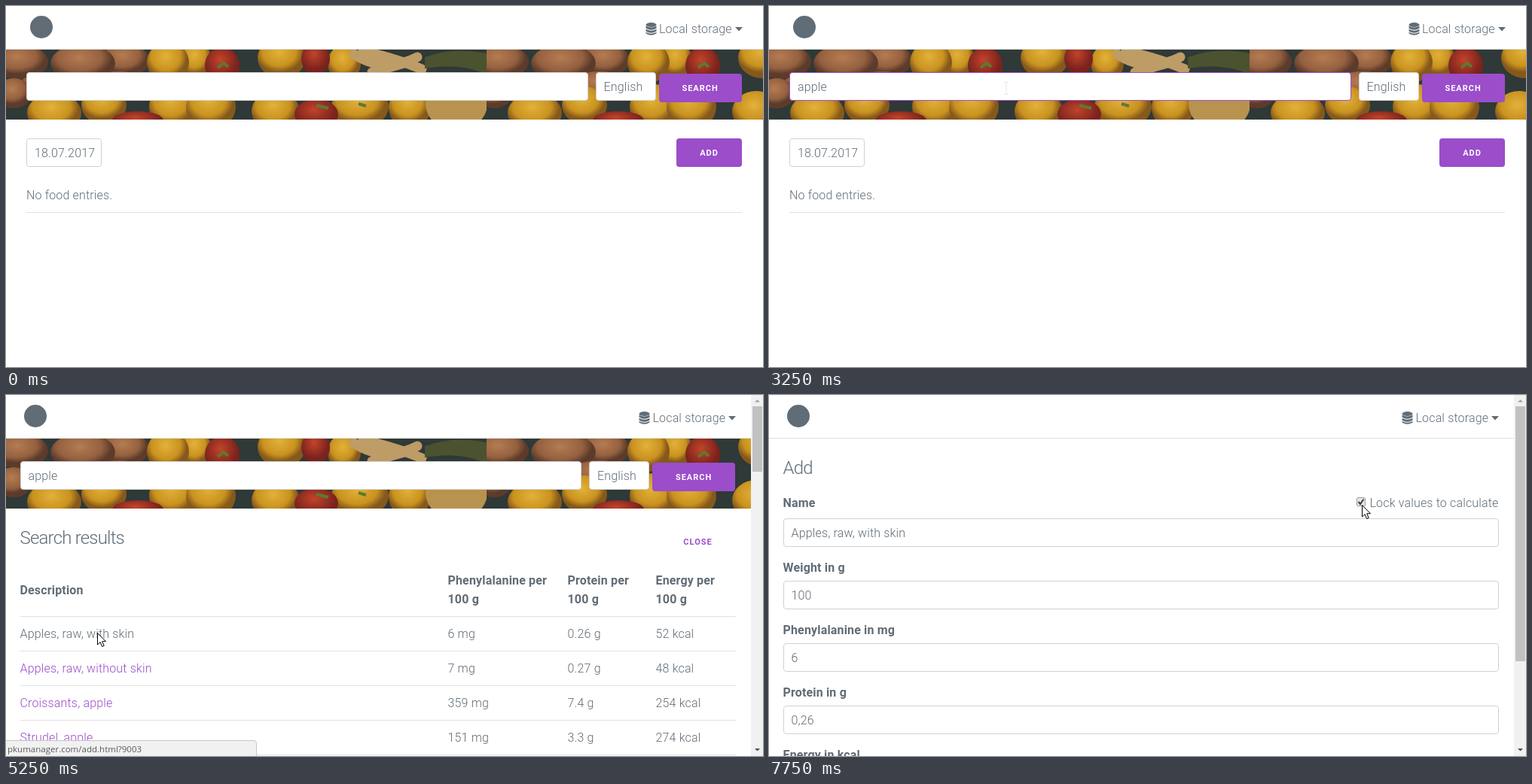
Write an HTML page that moves like this. It is 1005x480 px and loops after 8 s.

```html
<!DOCTYPE html>
<html lang="en">
<head>
<meta charset="utf-8">
<title>Food diary</title>
<style>
html, body { margin: 0; width: 100%; height: 100%; overflow: hidden; background: #fff; }
body { position: relative; color: #606c76; font: 300 16px/26px Roboto, sans-serif; letter-spacing: .01em; }
body *, body *::before { box-sizing: border-box; animation: 0s step-end infinite; }
.layer, .t, .box, .btn, .line, table, svg { position: absolute; }
.layer { left: 0; top: 0; width: 1005px; height: 480px; }
.wrap { position: absolute; top: 0; left: 27px; width: 950px; height: 480px; animation-name: shift; animation-duration: 8s; }
.t { white-space: nowrap; margin-top: -13px; }
b, th { font-weight: 700; }
h4 { margin: -13px 0 0; font-weight: 300; font-size: 24px; letter-spacing: -.8px; }
.box { height: 38px; padding: 0 10px; line-height: 37px; background: #fff; border: 1px solid #d1d1d1; border-radius: 4px; white-space: nowrap; }
.form .box { left: 0; width: 950px; }
.btn { height: 38px; line-height: 39px; text-align: center; border-radius: 4px; background: #9b4dca; color: #fff; font-size: 11px; font-weight: 700; letter-spacing: 1px; }
.plain { background: none; color: #9b4dca; }
.line { height: 1px; background: #e1e1e1; }
.logo { position: absolute; left: 5px; top: 13px; width: 30px; height: 30px; border-radius: 50%; background: #606c76; }

table { top: 234px; left: 0; width: 950px; table-layout: fixed; border-spacing: 0; text-align: left; line-height: 25px; }
th { padding: 0 0 10px; border-bottom: 1px solid #e1e1e1; }
td { padding: 10px 0; border-bottom: 1px solid #e1e1e1; }
td:first-child { color: #9b4dca; }

.caret { display: inline-block; width: 1px; height: 19px; vertical-align: -4px; background: #333; letter-spacing: 0; }
.status { position: absolute; left: -1px; top: 459px; width: 334px; height: 22px; padding-left: 2px; background: #f1f1f1; border: 1px solid #c6c6c6; border-radius: 0 4px 0 0; color: #5a5a5a; font: 400 11.5px/22px "Open Sans", sans-serif; letter-spacing: 0; }
.bar { position: absolute; left: 989px; top: 0; width: 16px; height: 480px; background: #f1f1f1; }
.thumb { position: absolute; left: 2px; top: 15px; width: 13px; height: 87px; background: #c1c1c1; }

/* one 8 s clock, a tick of 250 ms is 3.125% */
.home, .results, .form, .band, .bar, .thumb, .status, .value, .field, .caret, .k, .hot, .tick, .mouse, .arrow, .beam { animation-duration: 8s !important; }
.home { animation-name: home; }
.results { animation-name: results; }
.form { animation-name: form; }
.band { animation-name: band; }
.bar { animation-name: bar; }
.thumb { animation-name: thumb; }
.status { animation-name: status; }
.value { animation-name: value; }
.field { animation-name: focus; }
.caret { animation-name: caret; }
.k { font-size: 0; }
.k1 { animation-name: k1; }
.k2 { animation-name: k2; }
.k3 { animation-name: k3; }
.k4 { animation-name: k4; }
td.hot { animation-name: hot; }
.tick { animation-name: tick; }
.mouse { animation-name: move; }
.arrow { animation-name: arrow; }
.beam { animation-name: beam; }

@keyframes shift { 0% { left: 27px } 43.75% { left: 18.5px } }
@keyframes home { 0% { opacity: 1 } 43.75% { opacity: 0 } }
@keyframes results { 0% { opacity: 0 } 43.75% { opacity: 1 } 68.75% { opacity: 0 } }
@keyframes form { 0% { opacity: 0 } 68.75% { opacity: 1 } }
@keyframes band { 0% { opacity: 1 } 68.75% { opacity: 0 } }
@keyframes bar { 0% { opacity: 0 } 43.75% { opacity: 1 } }
@keyframes thumb { 0% { height: 87px } 68.75% { height: 339px } }
@keyframes status { 0% { opacity: 0 } 59.375% { opacity: 1 } 71.875% { opacity: 0 } }
@keyframes value { 0% { opacity: 0 } 71.875% { opacity: 1 } }
@keyframes focus { 0% { border-color: #d1d1d1 } 15.625% { border-color: #9b4dca } 65.625% { border-color: #d1d1d1 } }
@keyframes caret {
  0% { opacity: 0 } 15.625% { opacity: 1 } 21.875% { opacity: 0 } 25% { opacity: 1 }
  40.625% { opacity: 0 } 46.875% { opacity: 1 } 53.125% { opacity: 0 }
}
@keyframes k1 { 0% { font-size: 0 } 25% { font-size: 16px } }
@keyframes k2 { 0% { font-size: 0 } 28.125% { font-size: 16px } }
@keyframes k3 { 0% { font-size: 0 } 31.25% { font-size: 16px } }
@keyframes k4 { 0% { font-size: 0 } 34.375% { font-size: 16px } }
@keyframes hot { 0% { color: #9b4dca } 59.375% { color: #606c76 } }
@keyframes tick { 0% { opacity: 0 } 96.875% { opacity: 1 } }
@keyframes move {
  0%, 3.125% { transform: translate(462px, 362px) }
  6.25% { transform: translate(418px, 294px) }
  9.375% { transform: translate(372px, 232px) }
  12.5% { transform: translate(315px, 109px) }
  50% { transform: translate(302px, 166px) }
  53.125% { transform: translate(256px, 234px) }
  56.25% { transform: translate(192px, 287px) }
  59.375% { transform: translate(139px, 312px) }
  62.5% { transform: translate(121px, 316px) }
  75% { transform: translate(172px, 296px) }
  78.125% { transform: translate(338px, 234px) }
  81.25% { transform: translate(556px, 189px) }
  84.375% { transform: translate(915px, 183px) }
  87.5% { transform: translate(868px, 158px) }
  90.625% { transform: translate(812px, 149px) }
  93.75% { transform: translate(787px, 146px) }
}
@keyframes arrow {
  0% { opacity: 0 } 3.125% { opacity: 1 } 12.5% { opacity: 0 } 50% { opacity: 1 }
  81.25% { opacity: 0 } 87.5% { opacity: 1 }
}
@keyframes beam { 0% { opacity: 0 } 12.5% { opacity: 1 } 50% { opacity: 0 } 81.25% { opacity: 1 } 87.5% { opacity: 0 } }
</style>
</head>
<body>

<!-- vegetable strip, tiled every 638px -->
<svg class="band" style="left:0;top:58px" width="1005" height="93">
  <defs>
    <radialGradient id="potato" cx=".45" cy=".35"><stop offset="0" stop-color="#b57c52"/><stop offset=".7" stop-color="#94603f"/><stop offset="1" stop-color="#5c3b2b"/></radialGradient>
    <radialGradient id="yellow" cx=".45" cy=".35"><stop offset="0" stop-color="#e2b23a"/><stop offset=".7" stop-color="#c9921f"/><stop offset="1" stop-color="#85581c"/></radialGradient>
    <radialGradient id="red" cx=".45" cy=".35"><stop offset="0" stop-color="#c2442a"/><stop offset="1" stop-color="#7a221d"/></radialGradient>
    <clipPath id="tile"><path d="M0 0h638v93H0z"/></clipPath>
    <g id="veg" clip-path="url(#tile)">
      <path fill="#2f3937" d="M0 0h638v93H0z"/>
      <g fill="url(#potato)">
        <ellipse cx="18" cy="16" rx="38" ry="23"/><ellipse cx="158" cy="14" rx="32" ry="22"/>
        <ellipse cx="102" cy="18" rx="43" ry="25"/><ellipse cx="55" cy="52" rx="42" ry="20"/>
        <ellipse cx="10" cy="58" rx="24" ry="20"/><ellipse cx="150" cy="48" rx="42" ry="19"/>
      </g>
      <g fill="url(#yellow)">
        <ellipse cx="252" cy="14" rx="21" ry="24"/><ellipse cx="215" cy="17" rx="28" ry="27"/>
        <ellipse cx="366" cy="11" rx="32" ry="27"/><ellipse cx="449" cy="18" rx="22" ry="24"/>
        <ellipse cx="64" cy="84" rx="36" ry="26"/><ellipse cx="130" cy="74" rx="30" ry="25"/>
        <ellipse cx="222" cy="76" rx="32" ry="30"/><ellipse cx="272" cy="76" rx="33" ry="30"/>
        <ellipse cx="358" cy="82" rx="32" ry="27"/><ellipse cx="470" cy="76" rx="38" ry="28"/>
        <ellipse cx="536" cy="77" rx="28" ry="28"/>
      </g>
      <g fill="url(#red)">
        <ellipse cx="287" cy="21" rx="23" ry="24"/><ellipse cx="411" cy="12" rx="19" ry="21"/>
        <ellipse cx="175" cy="94" rx="34" ry="12"/><ellipse cx="412" cy="86" rx="29" ry="20"/>
      </g>
      <path d="M462 6q40 26 84 4M474 2q45 10 78 24M486 30l50-14" fill="none" stroke="#bd9c66" stroke-width="13" stroke-linecap="round"/>
      <path d="M556 10q38-14 82-5v28q-34-16-82-8z" fill="#4a522f"/>
      <ellipse cx="598" cy="72" rx="41" ry="36" fill="#b8934f"/>
      <path d="M281 24l8-6 6 5M412 74l16 4M468 72l10 3" fill="none" stroke="#5d7a30" stroke-width="4"/>
    </g>
  </defs>
  <use href="#veg"/><use href="#veg" x="638"/>
</svg>

<div class="line" style="left:0;top:57px;width:1005px;background:#dcdedf"></div>

<div class="wrap">
  <div class="logo"></div>
  <svg style="left:821.5px;top:22px" width="15" height="17" fill="#606c76">
    <ellipse cx="7.5" cy="3" rx="7" ry="3"/>
    <path d="M.5 4.500q7 4 14 0v3q-7 4.500-14 0zM.5 8.700q7 4 14 0v2.800q-7 4.500-14 0zM.5 12.700q7 4 14 0v1.800q-7 4.500-14 0z"/>
  </svg>
  <span class="t" style="left:840px;top:31px">Local storage</span>
  <svg style="left:940.5px;top:28px" width="10" height="6" fill="#606c76"><path d="M0 0h10L5 5.500z"/></svg>

  <div class="band">
    <div class="box field" style="left:0;top:88px;width:745.5px"><span class="k k1">a</span><span class="k k2">p</span><span class="k k3">pl</span><span class="k k4">e</span><i class="caret"></i></div>
    <div class="box" style="left:755.5px;top:88px;width:80px">English</div>
    <div class="btn" style="left:839.6px;top:90px;width:110px">SEARCH</div>
  </div>

  <div class="home">
    <div class="box" style="left:0;top:176px;width:100px">18.07.2017</div>
    <div class="btn" style="left:863px;top:176px;width:87px">ADD</div>
    <span class="t" style="left:0;top:252px">No food entries.</span>
    <div class="line" style="left:0;top:274px;width:950px"></div>
  </div>

  <div class="results">
    <h4 class="t" style="left:0;top:190px">Search results</h4>
    <div class="btn plain" style="left:850px;top:176px;width:100px">CLOSE</div>
    <table>
      <colgroup><col style="width:568px"><col style="width:159px"><col style="width:117px"><col></colgroup>
      <tr><th>Description<th>Phenylalanine per<br>100 g<th>Protein per<br>100 g<th>Energy per<br>100 g</tr>
      <tr><td class="hot">Apples, raw, with skin<td>6 mg<td>0.26 g<td>52 kcal</tr>
      <tr><td>Apples, raw, without skin<td>7 mg<td>0.27 g<td>48 kcal</tr>
      <tr><td>Croissants, apple<td>359 mg<td>7.4 g<td>254 kcal</tr>
      <tr><td>Strudel, apple<td>151 mg<td>3.3 g<td>274 kcal</tr>
    </table>
  </div>

  <div class="form">
    <h4 class="t" style="left:0;top:97px">Add</h4>
    <b class="t" style="left:0;top:144px">Name</b>
    <svg style="left:761.5px;top:136px" width="13" height="13">
      <rect x=".5" y=".5" width="11" height="11" rx="1.500" fill="#e6e6e6" stroke="#a0a0a0"/>
      <path class="tick" d="M2.500 6l2.500 3L9.500 2.500" fill="none" stroke="#3c3c3c" stroke-width="2"/>
    </svg>
    <span class="t" style="right:0;top:144px">Lock values to calculate</span>
    <div class="box" style="top:164px"><span class="value">Apples, raw, with skin</span></div>
    <b class="t" style="left:0;top:230px">Weight in g</b>
    <div class="box" style="top:247px">100</div>
    <b class="t" style="left:0;top:313px">Phenylalanine in mg</b>
    <div class="box" style="top:330px"><span class="value">6</span></div>
    <b class="t" style="left:0;top:396px">Protein in g</b>
    <div class="box" style="top:413px"><span class="value">0,26</span></div>
    <b class="t" style="left:0;top:479px">Energy in kcal</b>
  </div>
</div>

<div class="status">pkumanager.com/add.html?9003</div>

<div class="bar">
  <div class="thumb"></div>
  <svg style="left:0;top:0" width="16" height="480">
    <path d="M5 9.500h7L8.500 6z" fill="#a3a3a3"/><path d="M5 470h7l-3.500 3.500z" fill="#505050"/>
  </svg>
</div>

<div class="layer mouse">
  <svg class="arrow" style="left:0;top:0" width="14" height="21">
    <path d="M.5 .5v15.500l3.600-3.400 2.500 5.900 2.600-1.100-2.500-5.700h4.800z" fill="#fff" stroke="#000"/>
  </svg>
  <svg class="beam" style="left:-4px;top:-8px" width="8" height="17">
    <path d="M1 .5h2.500M4.500 .5h2.500M4 1v15M1 16.500h2.500M4.500 16.500h2.500" stroke="#e2e2e2" fill="none"/>
  </svg>
</div>
</body>
</html>
```
